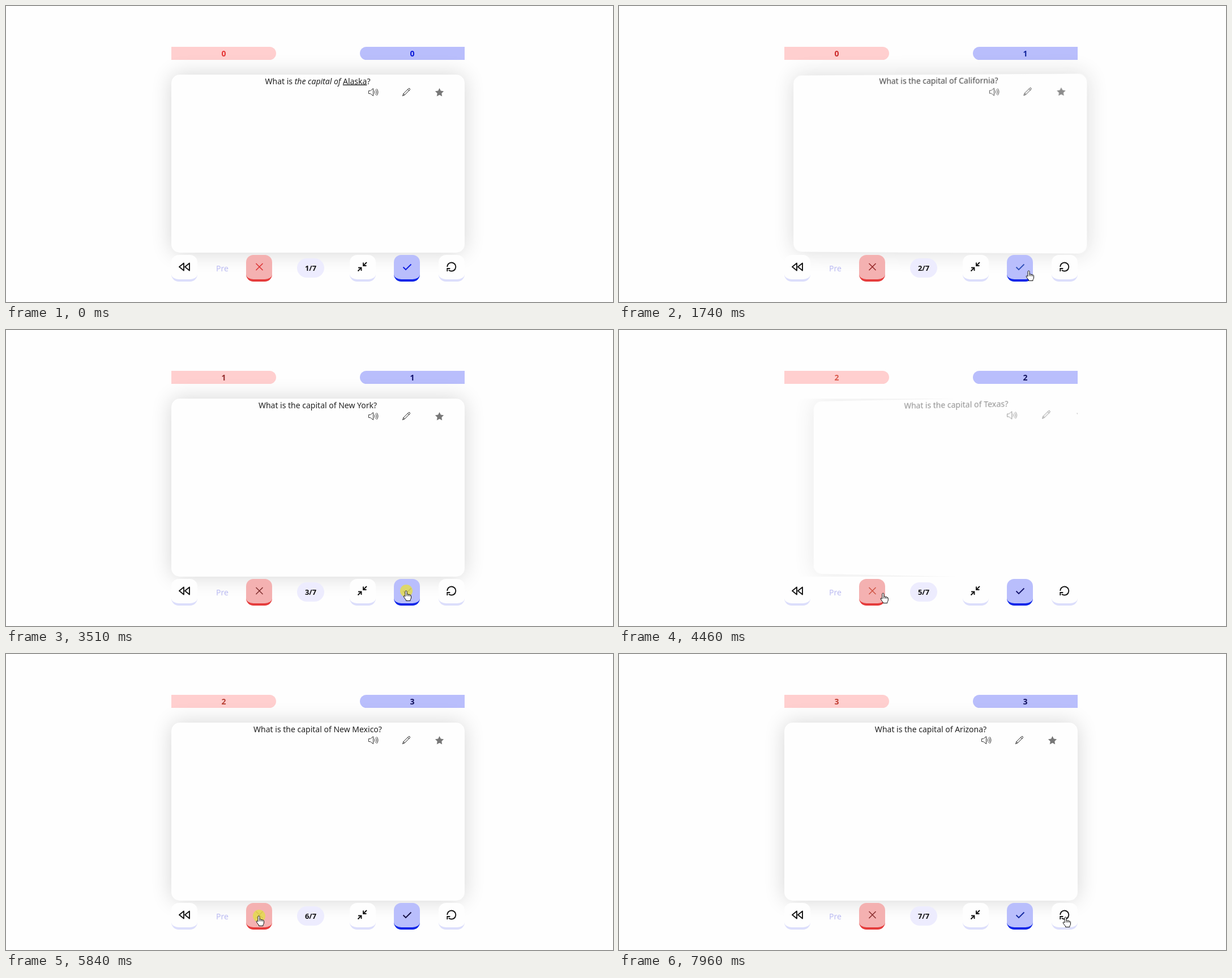
Animation of 1072 by 522 pixels, one loop 8 s. Source, as an HTML page:

```html
<!DOCTYPE html>
<html lang="en">
<head>
<meta charset="utf-8">
<title>Flashcards</title>
<style>
html, body { margin: 0; width: 100%; height: 100%; overflow: hidden; background: #fefefe; }
body { position: relative; font: 14px "Noto Sans", "Open Sans", sans-serif; }
div, svg { position: absolute; box-sizing: border-box; }
.score { top: 72px; width: 185px; height: 23px; line-height: 24px; text-align: center; font-weight: 700; }
#wrong { left: 292px; background: #ffcfcf; border-radius: 0 12px 12px 0; }
#right { left: 625px; background: #b9befc; border-radius: 12px 0 0 12px; }
#frame { left: 292px; top: 121px; width: 518px; height: 314px; }
#card { inset: 0; border-radius: 15px; background: #fefefe; box-shadow: 0 0 36px rgba(0,0,0,.16); }
.btn { top: 439px; width: 46px; height: 47px; border-radius: 13px; background: #fefefe; border-bottom: 4.5px solid #dcdefb; }
#pill { left: 514px; top: 445px; width: 48px; height: 34px; border-radius: 17px; background: #edecfe;
  line-height: 34px; text-align: center; font-size: 13px; font-weight: 600; color: #111; }
#pre { left: 371px; top: 453px; line-height: 20px; color: #bcbcf2; }
#icons { left: 0; top: 0; fill: none; stroke: #151515; stroke-width: 1.9; }
</style>
</head>
<body>
<div id="wrong" class="score"></div>
<div id="right" class="score"></div>
<div id="frame"><div id="card">
  <svg width="518" height="314" viewBox="292 121 518 314" fill="none" stroke="#222">
    <text id="question" x="550.5" y="137.5" text-anchor="middle" fill="#222" stroke="none"></text>
    <path d="M640.5 149.500h3l5-4v13l-5-4h-3zM650.500 149.500q2 2.500 0 5M652.500 147.500q4 4.500 0 9M654.500 146q5 6 0 12" stroke-width=".9"/>
    <path d="M700.500 158.500l1.500-4 9-9q1-.8 2 .2t.2 2l-9 9zM702 154.500l2.500 2.500M709.500 147l2.500 2.500" stroke-width="1"/>
    <path id="star" fill="#777" stroke="none"/>
  </svg>
</div></div>
<div class="btn" style="left:292px"></div>
<div id="pre">Pre</div>
<div class="btn" style="left:424px;background:#f4b1b1;border-color:#e53c3c"></div>
<div id="pill"></div>
<div class="btn" style="left:607px"></div>
<div class="btn" style="left:685px;background:#b9befc;border-color:#0b25e8"></div>
<div class="btn" style="left:764px"></div>
<svg id="icons" width="1072" height="522">
  <path d="M314 453.500v13l-8-6.500zM324 453.500v13l-8-6.500z" stroke-linejoin="round"/>
  <path id="cross" d="M441.500 454l12 12m0-12l-12 12" stroke-width="1.6"/>
  <path d="M621.500 467.500l6-6M622 461.500h5.500v5.500M637 452l-6 6M631 452.500v5.500h5.500"/>
  <path id="tick" d="M701.500 460.500l4.500 4.500 9.500-9.500"/>
  <path d="M779.300 460a7.500 7.500 0 1 1 2.600 5.700M779.300 468v-5h5"/>
  <circle id="press" r="11" fill="#e3dc50" fill-opacity=".85" stroke="none"/>
  <g id="cursor" fill="#fff" stroke="#111" stroke-width="1" stroke-linejoin="round">
    <path id="hand" d="M-2 10V1.500a1.500 1.500 0 0 1 3 0V6q1.500-1 2.700.5 1.500-.7 2.600.7 1.700-.3 2.200 1.300V12q0 2-1.500 3.500v2H-.5V16q-3-3-4.500-6.500 1-1.800 3 .5zM1 6v3.500M3.700 6.500v3M6.300 7.200v2.600"/>
    <path id="arrow" d="M0 0V15l3.500-3.300 2.200 5 2-.9-2.200-4.900h5z"/>
  </g>
</svg>
<script>
const $ = id => document.getElementById(id);
const LOOP = 8000, SLIDE = 500, PRESS = 150;
const ask = state => `What is the capital of ${state}?`;

// start time, question, wrong, right, then colours: wrong, right, cross, tick
const cards = [
  [-SLIDE, 'What is <tspan font-style="italic">the capital of</tspan> <tspan text-decoration="underline">Alaska</tspan>?',
    0, 0, '#e53333', '#0a18d8', '#dc3535', '#0a1be0'],
  [1435, ask('California'), 0, 1, '#cc2a2a', '#10249c', '#962a2a', '#3050b8'],
  [2830, ask('New York'), 1, 1, '#932c2c', '#10106c', '#803030', '#4a4a80'],
  [3640, ask('Florida'), 1, 2, '#932c2c', '#10105c', '#803030', '#2a2a70'],
  [4310, ask('Texas'), 2, 2, '#d95a4c', '#10105c', '#d05545', '#14146c'],
  [5180, ask('New Mexico'), 2, 3, '#b84034', '#10105c', '#a04c38', '#120c40'],
  [5920, ask('Arizona'), 3, 3, '#c03c30', '#10105c', '#8a3030', '#1228a0']
];

// pointer stops: time, x, y
const stops = [
  [70, 1024, 508], [560, 626, 452], [850, 700, 466], [990, 724, 467], [1760, 724, 467],
  [2260, 447, 458], [2880, 447, 458], [3350, 707, 460], [3680, 707, 460], [4140, 447, 463],
  [4360, 447, 464], [4960, 710, 466], [5260, 710, 466], [5740, 447, 462], [5960, 447, 462],
  [6370, 707, 484], [6420, 707, 484], [7100, 312, 472], [7280, 316, 467], [7480, 316, 467],
  [7950, 789, 464]
];
const buttons = [292, 424, 607, 685, 764];

$('star').setAttribute('d', 'M' + Array.from({ length: 10 }, (_, i) => {
  const r = i % 2 ? 4 : 8, a = i * Math.PI / 5;
  return `${765.5 + r * Math.sin(a)} ${152.8 - r * Math.cos(a)}`;
}).join('L') + 'z');

function pointerAt(t) {
  const i = stops.findIndex(s => s[0] > t);
  if (i < 0) return stops.at(-1).slice(1);
  const [t0, x0, y0] = stops[i - 1], [t1, x1, y1] = stops[i];
  const u = (t - t0) / (t1 - t0), k = u * u * (3 - 2 * u);
  return [x0 + (x1 - x0) * k, y0 + (y1 - y0) * k];
}

const show = (id, on) => $(id).style.display = on ? '' : 'none';

let shown = -1;
function setCard(n) {
  if (n === shown) return;
  shown = n;
  const [, question, wrong, right, wrongColor, rightColor, crossColor, tickColor] = cards[n];
  $('question').innerHTML = question;
  $('wrong').textContent = wrong;
  $('right').textContent = right;
  $('pill').textContent = `${n + 1}/${cards.length}`;
  $('wrong').style.color = wrongColor;
  $('right').style.color = rightColor;
  $('cross').style.stroke = crossColor;
  $('tick').style.stroke = tickColor;
}

function draw() {
  const t = performance.now() % LOOP;
  const n = cards.findLastIndex(c => c[0] <= t);
  setCard(n);

  const u = Math.min(1, (t - cards[n][0]) / SLIDE), away = (1 - u) ** 2;
  const card = $('card').style;
  card.opacity = 1 - away;
  card.transform = away ? `perspective(650px) translateX(${90 * away}px) rotateY(${-10 * away}deg)` : 'none';
  $('frame').style.overflow = away > .25 ? 'hidden' : 'visible';

  const visible = t >= stops[0][0];
  show('cursor', visible);
  show('press', cards.some(c => t >= c[0] - PRESS && t < c[0]));
  if (visible) {
    const [x, y] = pointerAt(t), move = `translate(${x} ${y})`;
    $('cursor').setAttribute('transform', move);
    $('press').setAttribute('transform', move);
    const over = y >= 439 && y < 486 && buttons.some(b => x >= b && x < b + 46);
    show('hand', over);
    show('arrow', !over);
  }
  requestAnimationFrame(draw);
}
draw();
</script>
</body>
</html>
```
